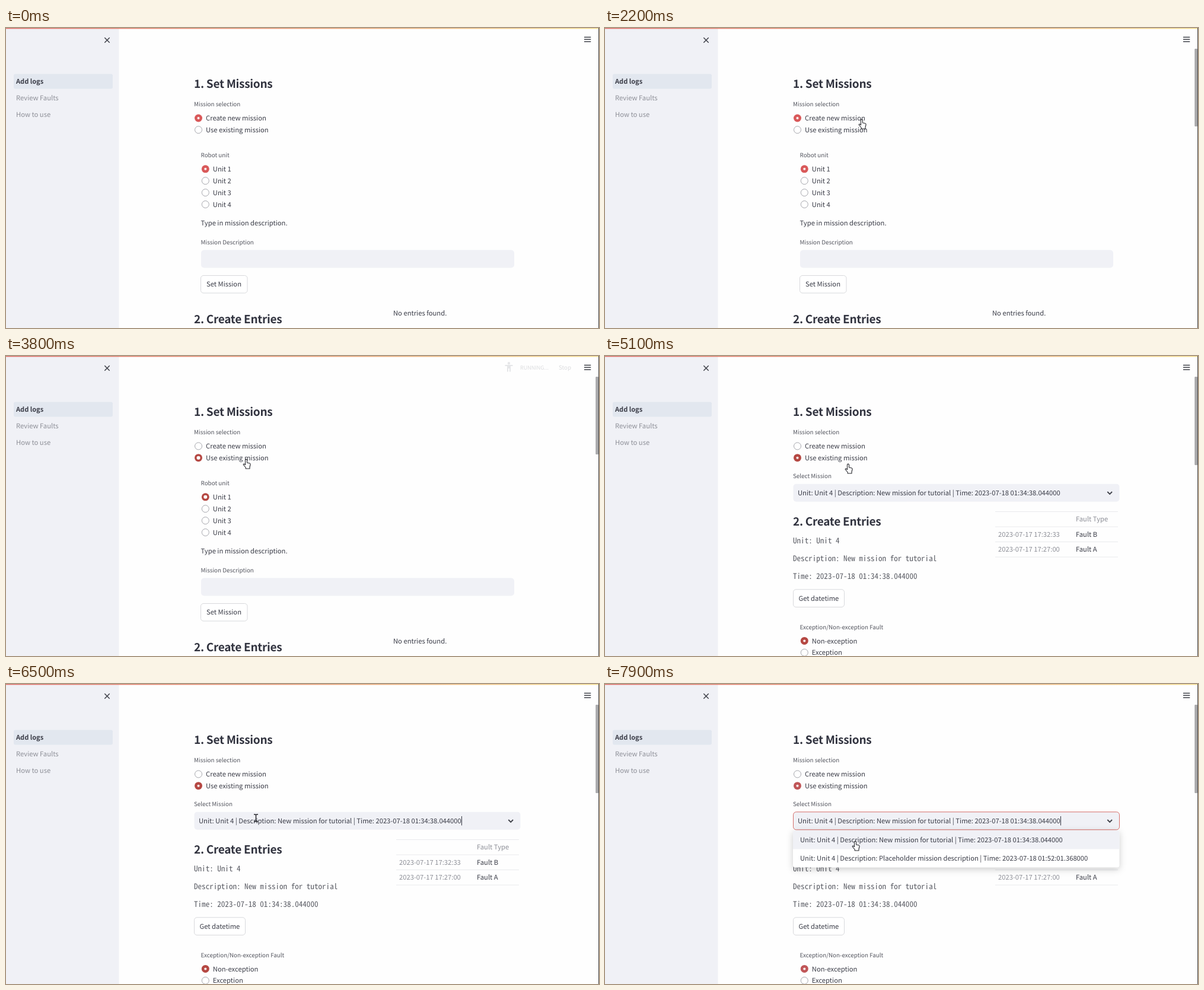
Write an HTML page that moves like this. It is 1000 px wide and 506 px high and loops after 8000 ms.

```html
<!DOCTYPE html>
<html lang="en">
<head>
<meta charset="utf-8">
<title>Mission log</title>
<style>
  html, body { margin: 0; height: 100%; overflow: hidden; background: #fefefe; }
  svg { display: block; width: 100vw; height: 100vh; }
  text {
    font: 11.24px "Noto Sans CJK JP", "Noto Sans CJK SC", "Noto Sans CJK", "Open Sans", sans-serif;
    fill: #3a3c47; white-space: pre; text-rendering: geometricPrecision;
  }
  .label { font-size: 9.83px; fill: #53555e; }
  .title { font-size: 19px; font-weight: 600; letter-spacing: -.015em; fill: #31333f; }
  .active { font-size: 11px; font-weight: 600; }
  .muted { fill: #8d8f97; }
  .mono {
    font-family: "Noto Sans Mono CJK JP", "Noto Sans Mono CJK SC", "Noto Sans Mono", monospace;
    font-size: 13.1px; font-size-adjust: ch-width .5; fill: #595b63;
  }
  .field { fill: #f0f1f6; }
  .button { fill: #fff; stroke: #d8d9dc; }
  .rule { stroke: #e9eaed; }
  .line { fill: none; stroke: #3f4149; stroke-width: 1.5; }
  .off { fill: #fff; stroke: #9c9da4; stroke-width: .9; }
  .on { fill: var(--accent); }
  .dot { fill: #fff; }
  .cursor path { fill: #fff; stroke: #26272c; stroke-width: 1.1; stroke-linejoin: round; }
  .cursor .beam { fill: none; stroke-width: 1.5; }
  #menu .panel { fill: #fff; filter: drop-shadow(0 3px 6px rgba(0, 0, 0, .2)); }
</style>
</head>
<body>
<svg viewBox="0 0 1000 506" preserveAspectRatio="none">
  <defs>
    <linearGradient id="strip">
      <stop offset="0" stop-color="#df6e68"/>
      <stop offset=".5" stop-color="#e99a72"/>
      <stop offset="1" stop-color="#f3dc8c"/>
    </linearGradient>
  </defs>
  <rect width="1000" height="506" fill="#fefefe"/>
  <rect width="190.5" height="506" fill="#f0f1f6"/>
  <rect x="13" y="77.5" width="167" height="25" rx="3" fill="#e2e7ef"/>
  <text class="active" x="17" y="94">Add logs</text>
  <text class="muted" x="17" y="122">Review Faults</text>
  <text class="muted" x="17" y="150">How to use</text>
  <path class="line" d="M166.3 16.3l8.4 8.4m0-8.4l-8.4 8.4"/>
  <path class="line" d="M975 15.6h11.3m-11.3 3.7h11.3m-11.3 3.7h11.3"/>

  <text class="title" x="317" y="101">1. Set Missions</text>
  <text class="label" x="317" y="132">Mission selection</text>
  <g id="modes"></g>

  <g id="create">
    <text class="label" x="328.5" y="218">Robot unit</text>
    <g id="units"></g>
    <text x="328.5" y="333">Type in mission description.</text>
    <text class="label" x="328.5" y="365">Mission Description</text>
    <rect class="field" x="329" y="374.5" width="528" height="30" rx="5"/>
    <rect class="button" x="328.5" y="417.5" width="78.5" height="29.5" rx="4.5"/>
    <text x="338" y="436">Set Mission</text>
    <text class="title" x="317" y="498">2. Create Entries</text>
    <text x="653" y="485">No entries found.</text>
  </g>

  <g id="existing">
    <text class="label" x="317" y="206">Select Mission</text>
    <rect id="select" class="field" x="317.5" y="215.8" width="550" height="30" rx="5"/>
    <text x="325" y="235">Unit: Unit 4 | Description: New mission for tutorial | Time: 2023-07-18 01:34:38.044000</text>
    <path id="caret" d="M768.5 223v15.5" stroke="#31333f"/>
    <path class="line" d="M847.3 229l3.9 3.9 3.9-3.9" style="stroke-width:1.8"/>
    <text class="title" x="317" y="286">2. Create Entries</text>
    <text class="mono" x="317" y="316.3">Unit: Unit 4</text>
    <text class="mono" x="317" y="346.3">Description: New mission for tutorial</text>
    <text class="mono" x="317" y="376">Time: 2023-07-18 01:34:38.044000</text>
    <path class="rule" d="M658 262.5h207m-207 25.5h207m-207 25.5h207m-207 25.5h207"/>
    <text class="muted" x="794" y="279">Fault Type</text>
    <text class="muted" x="663" y="304.5">2023-07-17 17:32:33</text>
    <text x="794" y="304.5">Fault B</text>
    <text class="muted" x="663" y="330">2023-07-17 17:27:00</text>
    <text x="794" y="330">Fault A</text>
    <rect class="button" x="317.5" y="393.8" width="86" height="29.7" rx="4.5"/>
    <text x="326.5" y="413">Get datetime</text>
    <text class="label" x="328.5" y="460.5">Exception/Non-exception Fault</text>
    <g id="faults"></g>
  </g>

  <g id="menu">
    <rect class="panel" x="317" y="247" width="550.5" height="62.5" rx="4"/>
    <path class="field" d="M317 251q0-4 4-4h542.5q4 0 4 4v27.5h-550.5z"/>
    <text x="329" y="266.5">Unit: Unit 4 | Description: New mission for tutorial | Time: 2023-07-18 01:34:38.044000</text>
    <text x="329" y="298">Unit: Unit 4 | Description: Placeholder mission description | Time: 2023-07-18 01:52:01.368000</text>
  </g>

  <g id="running">
    <g fill="none" stroke="#aeb0b6" stroke-width="2">
      <circle cx="848" cy="12.2" r="1.2"/>
      <path d="M841.5 16h13m-6.500 0v5m-2-5v10.500m4-10.500v10.500"/>
    </g>
    <text class="muted" x="867" y="22.5" style="font-size:9px">RUNNING...</text>
    <text class="muted" x="932" y="22.500" style="font-size:9.8px">Stop</text>
  </g>

  <rect id="scroll" x="994.3" y="35" width="4.7" rx="1" fill="#a9a9ab"/>
  <rect width="1000" height="1.4" fill="url(#strip)"/>
  <rect x="999" width="1" height="506" fill="#4a4a4c"/>

  <g id="cursor" class="cursor">
    <path id="arrow" d="M0 0v13l3-2.800 2 4.600 2.200-1-2-4.500h4.200z"/>
    <path id="hand" d="M-1.500 1.300Q0-1 1.500 1.300V6l4 .8q1.800.5 1.600 2.200L6 13.500V16H-.8v-2L-4.700 9.500q-.3-1.800 1.500-1.300l1.700 1.500z"/>
    <path id="beam" class="beam" d="M-3.500-6h2.500l1 1 1-1h2.500M0-5V5M-3.500 6h2.500l1-1 1 1h2.500"/>
  </g>
</svg>
<script>
const LOOP = 8000, STEP = 100;
const $ = id => document.getElementById(id);
const show = (id, visible) => $(id).style.display = visible ? '' : 'none';

function radios(id, x, y, gap, labels) {
  $(id).innerHTML = labels.map((label, i) => {
    const cy = y + i * gap;
    return `<g class="radio">
      <circle class="off" cx="${x}" cy="${cy}" r="6"/>
      <circle class="on" cx="${x}" cy="${cy}" r="6.5"/>
      <circle class="dot" cx="${x}" cy="${cy}" r="2"/>
      <text x="${x + 12.5}" y="${cy + 4.2}">${label}</text></g>`;
  }).join('');
}

function choose(id, index, dotSize = 2) {
  [...$(id).children].forEach((radio, i) => {
    const [off, on, dot] = radio.children;
    off.style.display = i === index ? 'none' : '';
    on.style.display = dot.style.display = i === index ? '' : 'none';
    dot.setAttribute('r', dotSize);
  });
}

// Each key is a time followed by its values.
function track(keys, t) {
  const next = keys.findIndex(key => key[0] > t);
  if (next < 0) return keys[keys.length - 1].slice(1);
  if (next === 0) return keys[0].slice(1);
  const a = keys[next - 1], b = keys[next];
  const k = (t - a[0]) / (b[0] - a[0]);
  return a.slice(1).map((v, i) => v + (b[i + 1] - v) * k);
}

const pointerPath = [
  [1300, 640, 325], [1600, 560, 262], [1800, 545, 250], [2200, 433, 154],
  [2600, 406, 173], [2700, 405, 174], [5000, 405, 174], [5100, 410, 182],
  [5800, 421.500, 226], [6500, 421.500, 226], [6600, 421.500, 231],
  [7500, 421.500, 231], [7900, 422, 265]
];
const runningFade = [[3700, 0], [3800, .3], [3900, .8], [4000, .8], [4200, 0]];

function pointerShape(t, x, y) {
  if (t >= 5100 && y > 216 && y < 246) return 'beam';
  const onLabel = x < 442 && y < 183;
  return onLabel || y >= 247 && t > 7500 ? 'hand' : 'arrow';
}

function draw(t) {
  const clicked = t >= 3800, loaded = t >= 4000, open = t >= 6600;
  const accent = t < 3800 ? '#d9595a' : t < 7500 ? '#b54843' : '#c05658';
  document.body.style.setProperty('--accent', accent);

  const pressed = t === 3800 ? 3 : 2;
  choose('modes', clicked ? 1 : 0, pressed);
  choose('units', 0, pressed);
  show('create', !loaded);
  show('existing', loaded);
  show('menu', open);
  show('caret', t >= 6500 && t < 7100 || t >= 7600);
  $('select').style.stroke = open ? '#d66d69' : 'none';
  $('running').style.opacity = track(runningFade, t)[0];

  show('scroll', t >= 1300);
  $('scroll').setAttribute('height', loaded ? 149 : 131);

  const [x, y] = track(pointerPath, t);
  const shape = pointerShape(t, x, y);
  show('cursor', t >= 1300);
  $('cursor').setAttribute('transform', `translate(${x} ${y})`);
  for (const id of ['arrow', 'hand', 'beam']) show(id, id === shape);
}

radios('modes', 324.5, 152, 19.7, ['Create new mission', 'Use existing mission']);
radios('units', 336.3, 237.8, 19.9, ['Unit 1', 'Unit 2', 'Unit 3', 'Unit 4']);
radios('faults', 336.3, 480.4, 19.8, ['Non-exception', 'Exception']);
choose('faults', 0);

function tick() {
  draw(Math.floor(performance.now() % LOOP / STEP) * STEP);
  requestAnimationFrame(tick);
}
tick();
</script>
</body>
</html>
```
